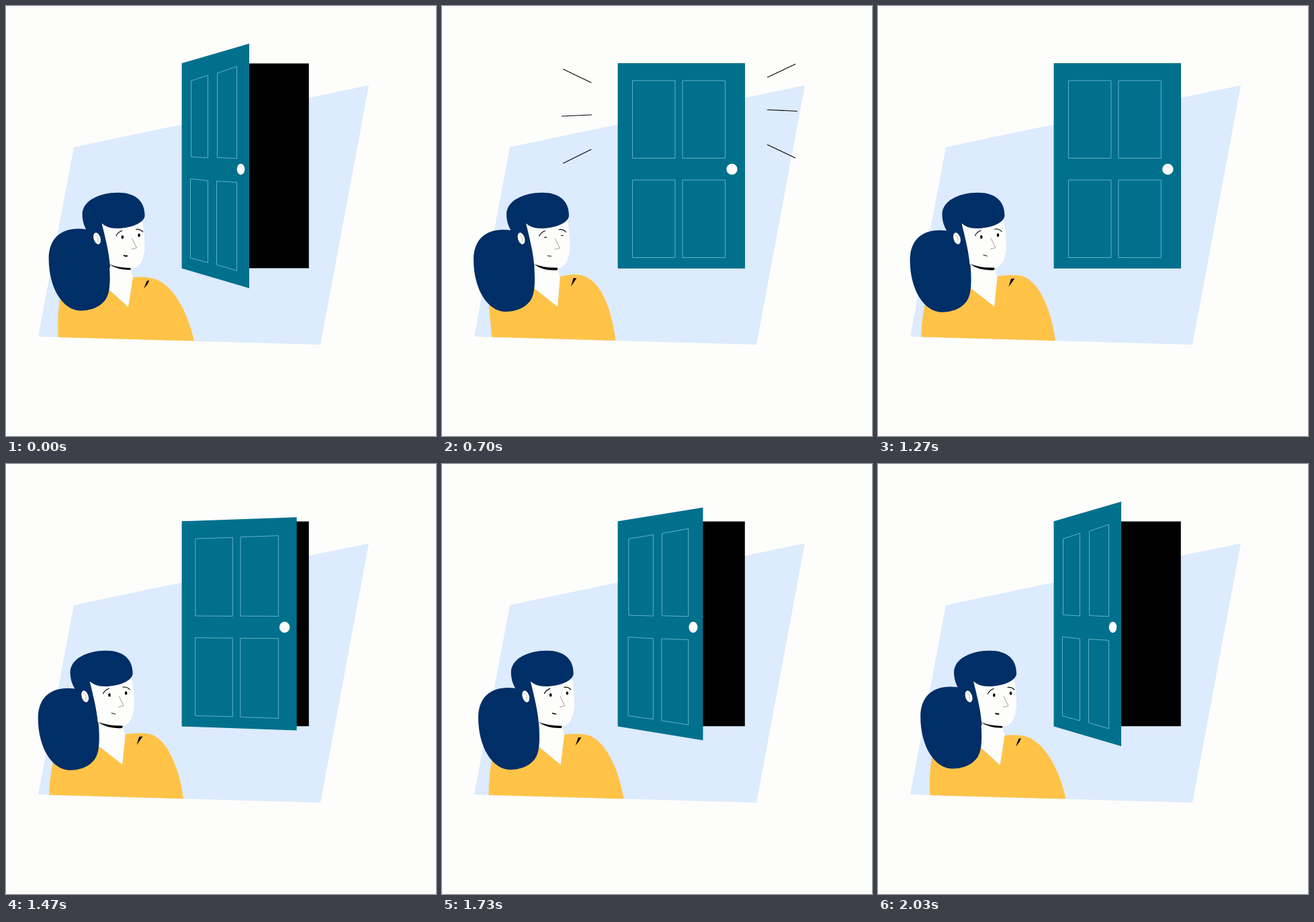
Animation of 640x640 px, one loop 2060 ms. Source, as an HTML page:

```html
<!DOCTYPE html>
<html lang="en">
<head>
<meta charset="utf-8">
<title>Slamming door</title>
<style>
html, body { margin: 0; width: 100%; height: 100%; overflow: hidden; background: #fdfdfb; }
svg { display: block; width: 100vw; height: 100vh; }
.line { fill: none; stroke: #000; stroke-linecap: round; stroke-linejoin: round; }
.hair { fill: #002e66; }
.skin { fill: #fdfdfc; }
</style>
</head>
<body>
<svg viewBox="0 0 640 640">
  <path fill="#dcebfd" d="M101 210L540 118L468 504L48 492Z"/>
  <path d="M262 85.5H450.800V390.300H262Z"/>
  <path id="door" fill="#00708c"/>
  <path id="panels" fill="none" stroke="#62b0c8" stroke-width="1"/>
  <ellipse id="knob" cy="243" ry="8.2" fill="#fdfdfc"/>
  <path id="rays" class="line" stroke-width="1.1"/>

  <path id="body" fill="#ffc348"/>
  <path id="notch"/>
  <path id="neck" class="skin"/>
  <path id="bun" class="hair"/>
  <path id="face" class="skin"/>
  <path id="choker"/>
  <g id="features">
    <g id="eyes"></g>
    <path class="line" stroke-width="1.2" d="M164.5 342Q167 336.5 173 334.5M194 332.5Q200 331.5 204 336"/>
    <path class="line" stroke-width=".7" style="stroke:#77726c" d="M188 346L195 360L187.5 362"/>
    <path id="mouth" class="line"/>
  </g>
  <g id="head">
    <path class="hair" d="M122 336C117 329 114 320 114 310C114 290 139 277.700 167 277.700C194 277.700 207 291 207 312C206 324 184 331 165 331C155 331 148 328 143 323.500L147 340C151 357 154 370 155.500 389L140 389L122 342Z"/>
    <ellipse class="skin" cx="136" cy="346" rx="5" ry="9" transform="rotate(-17 136 346)"/>
    <path class="line" stroke-width=".7" style="stroke:#b8a58c" d="M134 341Q139 344 137 350"/>
  </g>
</svg>
<script>
const LOOP = 2060;
const el = id => document.getElementById(id);
const clamp = u => Math.max(0, Math.min(1, u));
const lerp = (a, b, u) => a + (b - a) * u;

// Eased progress between two times.
function ease(t, from, to) {
  const u = clamp((t - from) / (to - from));
  return u * u * (3 - 2 * u);
}

// Blends path strings that share one structure.
const NUMBER = /-?\d+(\.\d+)?/g;
function blend(paths, weights) {
  const lists = paths.map(d => d.match(NUMBER).map(Number));
  let i = 0;
  return paths[0].replace(NUMBER, () => {
    const v = lists.reduce((sum, list, k) => sum + list[i] * weights[k], 0);
    i++;
    return v.toFixed(2);
  });
}

// Each pair: shut, open.
const door = [
  "M261.6 85.2L451 85.2L451 390.5L261.6 390.5Z",
  "M261.6 85.2L362 56L362 420L261.6 390.5Z"
];
const box = (x, y) => `M${x} ${y}L${x + 63.5} ${y}L${x + 63.5} ${y + 115.5}L${x} ${y + 115.5}Z`;
const panels = [
  box(283.5, 111) + box(358, 111) + box(283.5, 259) + box(358, 259),
  "M275.5 111.5L300.5 103L300.5 226L275.5 224.5Z" +
  "M314.5 100L343.5 90L343.5 227L314.5 225.5Z" +
  "M274.5 257L300.5 260L300.5 382L274.5 375Z" +
  "M313.5 260.5L343.5 262.5L343.5 394L313.5 385Z"
];

// Each triple: leaning in, startled, settled back.
const figure = {
  body: [
    "M78 493C77 470 78 455 80 438L140 410L182 448L189 404C197 403 206 403 213 404.5C243 407 268 446 280.5 498.6Z",
    "M74 492.8C73 477 71 462 70 446L125 410L172 447.5L176 402.5C184 401 190 400 197 399.5C236 399 252 450 258.5 498Z",
    "M64 492.5C65 475 66 462 70 444L125 410L173 447L177.5 402.5C186 401 198 400 208 401C236 402 257 446 264 498.2Z"
  ],
  notch: [
    "M210 409L213.5 408.5L211 414L205.5 420.5Z",
    "M195.5 405L200.5 405L197 410L192 417.5Z",
    "M198 406L203.5 405.5L199.5 411L194.5 418Z"
  ],
  neck: [
    "M148 380L185 389L189 404L182 448L148 416Z",
    "M131 380L172 389L175.5 403L172 447.5L131 415Z",
    "M132 380L173 389L177.5 403L173 447L132 415Z"
  ],
  choker: [
    "M153 384Q168 390 186 390L185.5 392.7Q167 393 153 384Z",
    "M137 384Q152 390 172 389.5L172 393Q150 395 137 384Z",
    "M137 384Q153 390 173.5 389.5L173 393Q151 394.5 137 384Z"
  ],
  mouth: [
    "M176 371.5Q178 372.5 180.5 372",
    "M177 371.5Q179 372 182 372",
    "M177 371Q180 371.5 182.5 372.5"
  ]
};
el("bun").setAttribute("d", "M64 376C64 346 82 331.5 108 331.5C125 331.5 140 336 146 346C152 362 155 385 155 405C155 421 153 433 146 440C138 449 125 453.5 111 453.5C85 453 64 420 64 376Z");
el("face").setAttribute("d", "M136 318L203 318C206 334 207 345 207 358C206 378 200 391 184 391.5C172 392 160 389 148 382Z");

const eyes = [[173.8, 344], [198.5, 341.3]].map(([x, y]) => {
  const eye = document.createElementNS("http://www.w3.org/2000/svg", "ellipse");
  eye.setAttribute("cx", x);
  eye.setAttribute("cy", y);
  el("eyes").append(eye);
  return eye;
});

// Inner end, outer end.
const rays = [
  [222, 114, 180.5, 94], [222.5, 162, 178.5, 164], [222, 213.5, 180.5, 234],
  [484.5, 106, 526, 86.5], [484.5, 154.5, 528.5, 156.5], [484.5, 206.5, 525.5, 226]
];
function rayPath(from, to) {
  if (to - from < 0.01) return "";
  return rays.map(([x, y, X, Y]) =>
    `M${lerp(x, X, from)} ${lerp(y, Y, from)}L${lerp(x, X, to)} ${lerp(y, Y, to)}`).join("");
}

function drawDoor(t) {
  const open = 1 - ease(t, 445, 645) + ease(t, 1252, 2002);
  const weights = [1 - open, open];
  el("door").setAttribute("d", blend(door, weights));
  el("panels").setAttribute("d", blend(panels, weights));
  el("knob").setAttribute("cx", lerp(431.5, 349.5, open));
  el("knob").setAttribute("rx", lerp(8.2, 5.8, open));
  el("rays").setAttribute("d", rayPath(ease(t, 760, 880), ease(t, 600, 690)));
}

function drawWoman(t) {
  // The lean forward finishes just after the loop point.
  const lean = ease(t < 200 ? t + LOOP : t, 1439, 2122);
  const jump = ease(t, 510, 695);
  const settle = ease(t, 715, 930);
  const weights = t >= 200 && t < 1200
    ? [1 - jump, jump * (1 - settle), jump * settle]
    : [lean, 0, 1 - lean];
  const mix = (startled, settled) => startled * weights[1] + settled * weights[2];
  const move = (id, x, y = 0) => el(id).setAttribute("transform", `translate(${x} ${y})`);

  for (const id in figure) el(id).setAttribute("d", blend(figure[id], weights));
  move("bun", mix(-17, -16.4), mix(1.5, 2.3));
  move("head", mix(-18, -18.5));
  move("face", mix(-16.5, -16.2));
  move("features", mix(-19.7, -20), mix(0.3, -0.3));
  el("mouth").setAttribute("stroke-width", lerp(1, 2, weights[0]));

  const shut = ease(t, 580, 660) * (1 - ease(t, 740, 840));
  for (const eye of eyes) {
    eye.setAttribute("rx", lerp(1.8, 2.2, shut));
    eye.setAttribute("ry", lerp(2.7, 0.7, shut));
  }
}

const start = performance.now();
function tick() {
  const t = (performance.now() - start) % LOOP;
  drawDoor(t);
  drawWoman(t);
  requestAnimationFrame(tick);
}
tick();
</script>
</body>
</html>
```
